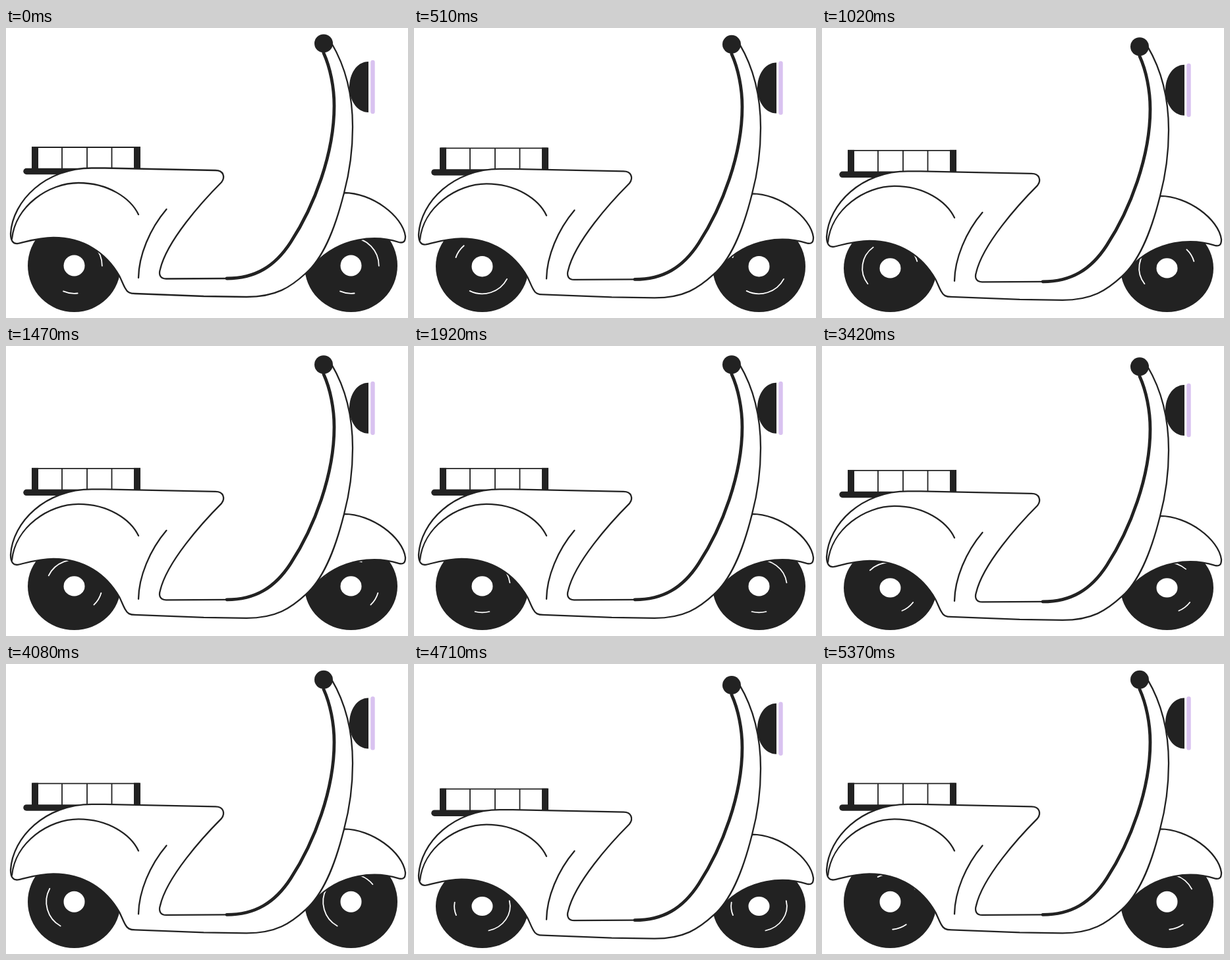
Animation, 610 px wide and 440 px high, one loop 5400 ms. Source, as an HTML page with a canvas:

```html
<!DOCTYPE html>
<html lang="en">
<head>
<meta charset="utf-8">
<title>Scooter</title>
<style>
  html, body { margin: 0; width: 100%; height: 100%; overflow: hidden; background: #fff; }
  canvas { display: block; }
</style>
</head>
<body>
<canvas id="stage" width="610" height="440"></canvas>
<script>
const ctx = document.getElementById('stage').getContext('2d');
const LOOP = 5400, STEP = 30, BOB = 450, TURNS = 14;
const INK = '#222', PAPER = '#fff', LILAC = '#d9c2f0';
const GROUND = 431;

const path = d => new Path2D(d);

const body = path(`M18 327 C11 328 7 323 7 312 C10 262 60 212.5 130 212.5 L150 212.5
  L318 216 C330 216 333 226 327 234 C298 263 244 323 234 366 C231 375 235 380.5 243 380.5
  L335 380 C378 380 408 362 432 325 C468 270 498 190 498 118 C498 90 492 60 482 37
  L494 23 C517 62 526 108 526 150 C526 190 521 220 513 250 C498 310 480 350 455 372
  C432 393 410 408 365 408 L300 407 L196 403 C188 403 184 401 181 395
  C178 390 176 384 172 376 C152 341 118 318 72 318 C50 318 32 324 18 327 Z`);
const shield = path('M482 38 C492 60 498 90 498 118 C498 190 468 270 432 325 C408 362 378 380 335 380');
const fender = path(`M513 250 C555 250 602 285 606 316 C606 323 604 327 596 325
  C562 314 508 316 468 358 Z`);
const creases = path(`M9 320 C14 270 65 235 110 235 C155 235 189 258 201 283
  M243.5 275 C218 305 201.5 345 201 379`);
const rack = path('M41 181 H202 M85 181 V214 M123 181 V214 M160.5 181 V214');
const lamp = path('M550 51 C532 51 521 70 521 89.5 S532 128 550 128 Z');

function stroke(shape, width, color = INK) {
  ctx.strokeStyle = color;
  ctx.lineWidth = width;
  ctx.stroke(shape);
}

function fill(shape, color) {
  ctx.fillStyle = color;
  ctx.fill(shape);
}

function disc(x, y, r, color) {
  const p = new Path2D();
  p.arc(x, y, r, 0, Math.PI * 2);
  fill(p, color);
}

// Highlight on the tyre: centre angle and half length in degrees
function glint(mid, half) {
  const rad = Math.PI / 180, p = new Path2D();
  p.arc(0, -70.5, 42.3, (mid - half) * rad, (mid + half) * rad);
  stroke(p, 1.8, PAPER);
}

// Wheels are squashed against the ground
function wheel(x, squash, angle) {
  ctx.save();
  ctx.translate(x, GROUND);
  ctx.scale(1, squash);
  disc(0, -70.5, 70.5, INK);
  disc(0, -70.5, 16, PAPER);
  glint(98 + angle, 15);
  glint(316 + angle, 44.5);
  ctx.restore();
}

function chassis(drop) {
  ctx.save();
  ctx.translate(0, drop);

  stroke(path('M31 217.5 H150'), 9.5);
  stroke(rack, 1.8);
  ctx.fillStyle = INK;
  ctx.fillRect(39, 180, 10, 35);
  ctx.fillRect(194, 180, 10, 35);

  fill(lamp, INK);
  stroke(path('M556.5 52 V127'), 6.4, LILAC);

  for (const part of [fender, body]) {
    fill(part, PAPER);
    stroke(part, 2.3);
  }
  stroke(creases, 2.3);
  stroke(shield, 4.8);
  disc(482, 23.4, 14, INK);

  ctx.restore();
}

function draw(now) {
  const t = Math.floor((now % LOOP) / STEP) * STEP;
  const sag = (1 - Math.cos(2 * Math.PI * t / BOB)) / 2;
  const angle = 360 * TURNS * t / LOOP % 360;

  ctx.fillStyle = PAPER;
  ctx.fillRect(0, 0, 610, 440);
  ctx.lineCap = ctx.lineJoin = 'round';
  for (const x of [103.5, 523.5]) wheel(x, 1 - 0.1 * sag, angle);
  chassis(8.8 * sag);
}

const start = performance.now();
function tick() {
  draw(performance.now() - start);
  requestAnimationFrame(tick);
}
tick();
</script>
</body>
</html>
```
